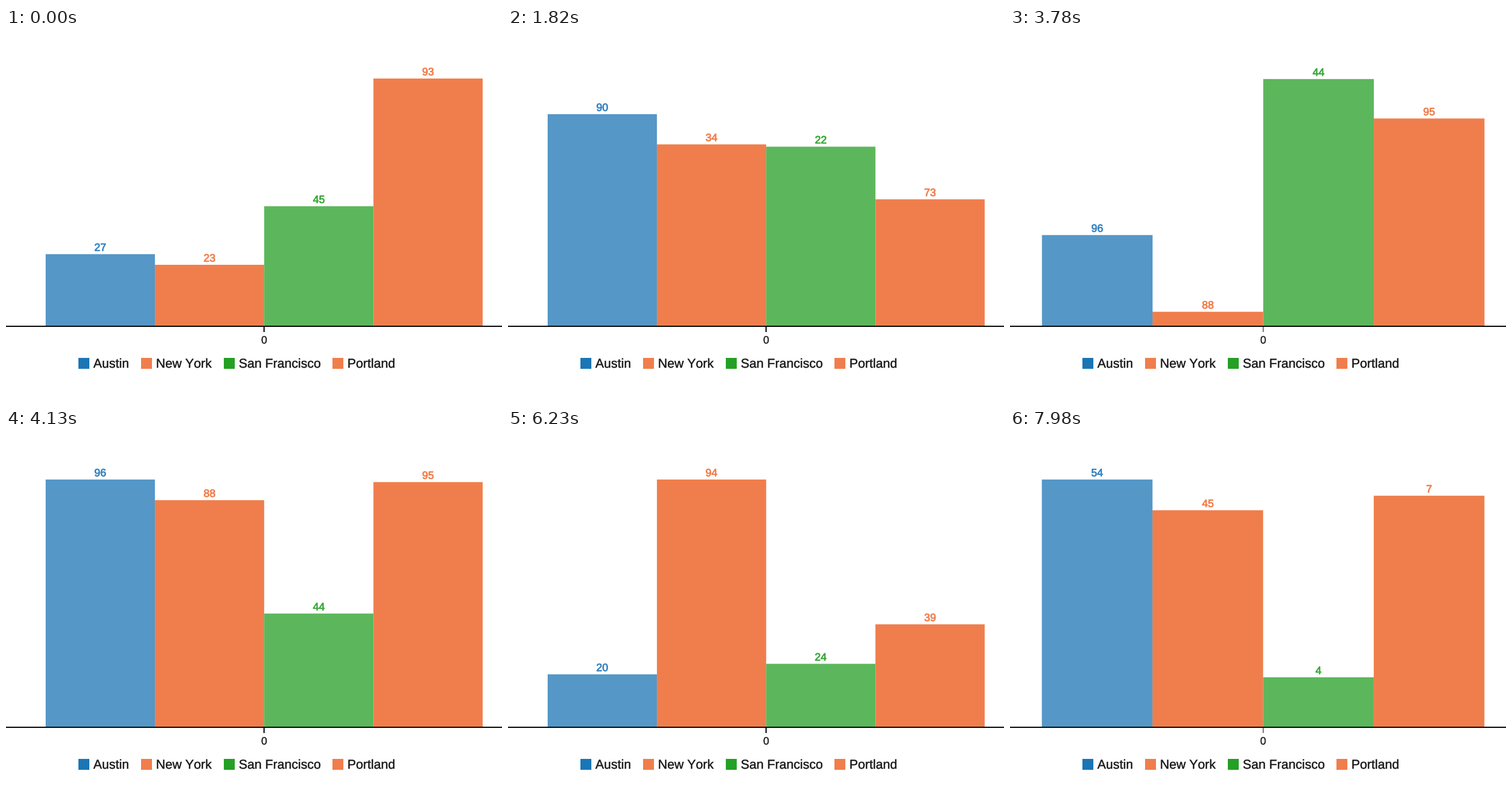
A matplotlib script for the animation above (8000 ms loop, 863x649 px).

```python
import matplotlib.pyplot as plt
from matplotlib.animation import FuncAnimation
from matplotlib.patches import PathPatch, Rectangle
from matplotlib.textpath import TextPath
from matplotlib.transforms import Affine2D

W, H, DPI = 863, 649, 72
INTERVAL, LOOP, STEP = 20, 8000, 70
BASE, FULL = 518.5, 430.6        # foot of the bars and height of the tallest
GROW, SLIDE = 400, 280           # durations of bar and margin transitions

NAMES = ["Austin", "New York", "San Francisco", "Portland"]
BAR_COLORS = ["#5597c7", "#f07e4c", "#5cb75c", "#f07e4c"]
KEY_COLORS = ["#1b76b5", "#f07e4c", "#24a024", "#f07e4c"]
TEXT_COLORS = ["#3483c2", "#f07e4c", "#38a838", "#f07e4c"]
KEY_X = [126, 235, 379, 568]

DATA = [
    (27, 23, 45, 93), (75, 91, 97, 33), (90, 34, 22, 73),
    (27, 4, 74, 62), (96, 88, 44, 95), (59, 87, 0, 41),
    (20, 94, 24, 39), (82, 72, 17, 80), (54, 45, 4, 7),
]
STARTS = [9, 24, 39, 54, 69, 84, 98, 113]   # in steps

plt.rcParams["text.kerning_factor"] = 6      # plain advances, no kerning

fig = plt.figure(figsize=((W + 0.01) / DPI, (H + 0.01) / DPI), dpi=DPI,
                 facecolor="white")
ax = fig.add_axes([0, 0, 1, 1])
ax.set_xlim(0, W)
ax.set_ylim(H, 0)
ax.axis("off")


def ease(u):
    """Cubic in and out."""
    u = min(max(u, 0), 1)
    return 4 * u ** 3 if u < 0.5 else 1 - 4 * (1 - u) ** 3


def mix(a, b, e):
    return a + (b - a) * e


def glyphs(text, size, centered=True):
    path = TextPath((0, 0), text, size=size, prop={"family": "Liberation Sans"})
    box = path.get_extents()
    dx = -(box.x0 + box.x1) / 2 if centered else 0
    return path.transformed(Affine2D().translate(dx, 0).scale(1, -1))


def place(patch, x, y):
    patch.set_transform(Affine2D().translate(x, y) + ax.transData)


def add_text(path, x, y, color, weight=0.5):
    patch = PathPatch(path, facecolor=color, edgecolor=color, lw=weight,
                      zorder=4)
    ax.add_patch(patch)
    place(patch, x, y)
    return patch


def add_rect(x, y, w, h, color, z=1, snap=None):
    return ax.add_patch(Rectangle((x, y), w, h, facecolor=color, lw=0,
                                  zorder=z, snap=snap))


def heights(row):
    return [FULL * v / max(row) for v in row]


def layout(row):
    """Left edge inside the plot, bar width and margin shift.

    Small values need narrower axis labels, so the plot gets wider.
    """
    return (69, 190.1, 0) if max(row) >= 90 else (73.4, 192.5, -18)


DIGITS = {v: glyphs(str(v), 18.6) for row in DATA for v in row}

bars = [add_rect(0, BASE, 1, 0, c, snap=False) for c in BAR_COLORS]
labels = [add_text(DIGITS[0], 0, 0, c, 0.9) for c in TEXT_COLORS]
add_rect(0, 518, W, 2, "black", 3)
tick = add_rect(0, 519, 1.8, 10.5, "black", 3)
zero = add_text(DIGITS[0], 0, 0, "#222222")

for name, x, color in zip(NAMES, KEY_X, KEY_COLORS):
    add_rect(x, 574, 19, 19, color)
    add_text(glyphs(name, 22.35, False), x + 26, 591, "#1a1a1a")


def update(frame):
    step = (frame * INTERVAL + INTERVAL // 2) // STEP
    k = sum(s <= step for s in STARTS)
    row, old = DATA[k], DATA[max(k - 1, 0)]
    grow = slide = 1
    if k:
        lag = 40 if max(row) >= 90 else 22
        t = (step - STARTS[k - 1]) * STEP + lag
        grow, slide = ease(t / GROW), ease(t / SLIDE)

    (left0, width0, shift0), (left1, width1, shift1) = layout(old), layout(row)
    width = mix(width0, width1, grow)
    left = mix(left0, left1, grow) + mix(shift0, shift1, slide)

    for i, (h0, h1) in enumerate(zip(heights(old), heights(row))):
        h, x = mix(h0, h1, grow), left + i * width
        bars[i].set_bounds(x, BASE - h, width, h)
        labels[i].set_path(DIGITS[row[i]])
        place(labels[i], x + width / 2, BASE - h - 5.6)

    middle = left + 2 * width
    tick.set_x(middle - 0.9)
    place(zero, middle, 549)
    return bars + labels + [tick, zero]


anim = FuncAnimation(fig, update, frames=LOOP // INTERVAL, interval=INTERVAL,
                     repeat=True, repeat_delay=0, blit=False)
plt.show()
```
